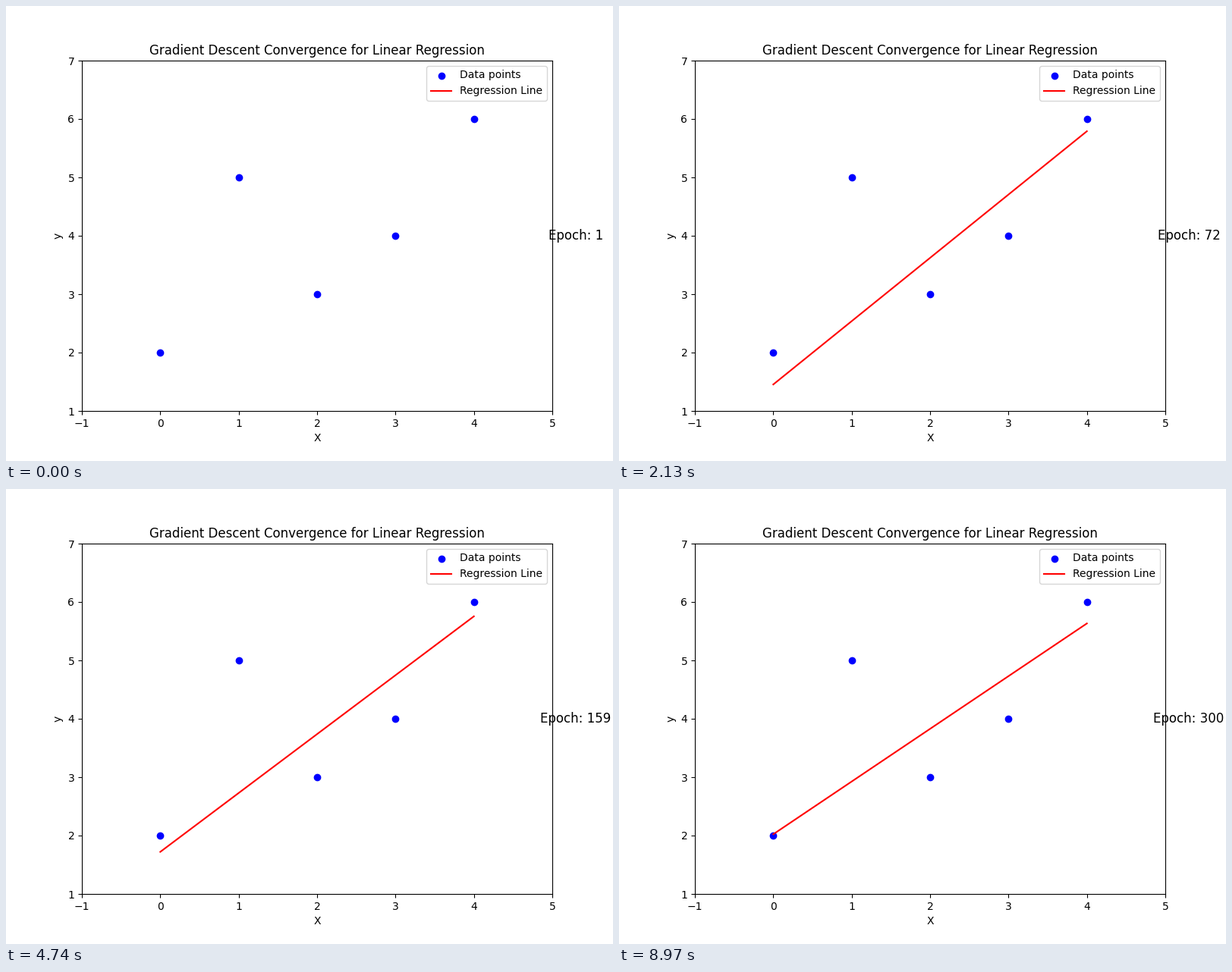
A matplotlib script for the animation above (9000 ms loop, 800 px wide and 600 px high).

```python
import numpy as np
import matplotlib.pyplot as plt
from matplotlib.animation import FuncAnimation

EPOCHS = 300
RATE = 0.01
START = (-1.0, 0.42)  # slope, intercept

X = np.arange(5.0)
y = np.array([2.0, 5.0, 3.0, 4.0, 6.0])


def descend(w, b):
    """Return slope and intercept at every epoch."""
    path = []
    for _ in range(EPOCHS):
        path.append((w, b))
        err = w * X + b - y
        w, b = w - RATE * np.mean(err * X), b - RATE * np.mean(err)
    return path


path = descend(*START)

plt.rcParams["font.family"] = "DejaVu Sans"
fig, ax = plt.subplots(figsize=(8, 6), dpi=100)
ax.scatter(X, y, color="blue", label="Data points")
line, = ax.plot([], [], color="red", label="Regression Line")
counter = ax.text(1.05, 0.5, "", transform=ax.transAxes, fontsize=12,
                  ha="center", va="center")
ax.set(xlim=(-1, 5), ylim=(1, 7), xlabel="X", ylabel="y",
       title="Gradient Descent Convergence for Linear Regression")
ax.legend(loc="upper right")


def update(i):
    w, b = path[i]
    line.set_data(X, w * X + b)
    counter.set_text(f"Epoch: {i + 1}")
    return line, counter


anim = FuncAnimation(fig, update, frames=EPOCHS, interval=30, repeat=True,
                     repeat_delay=0)
plt.show()
```
